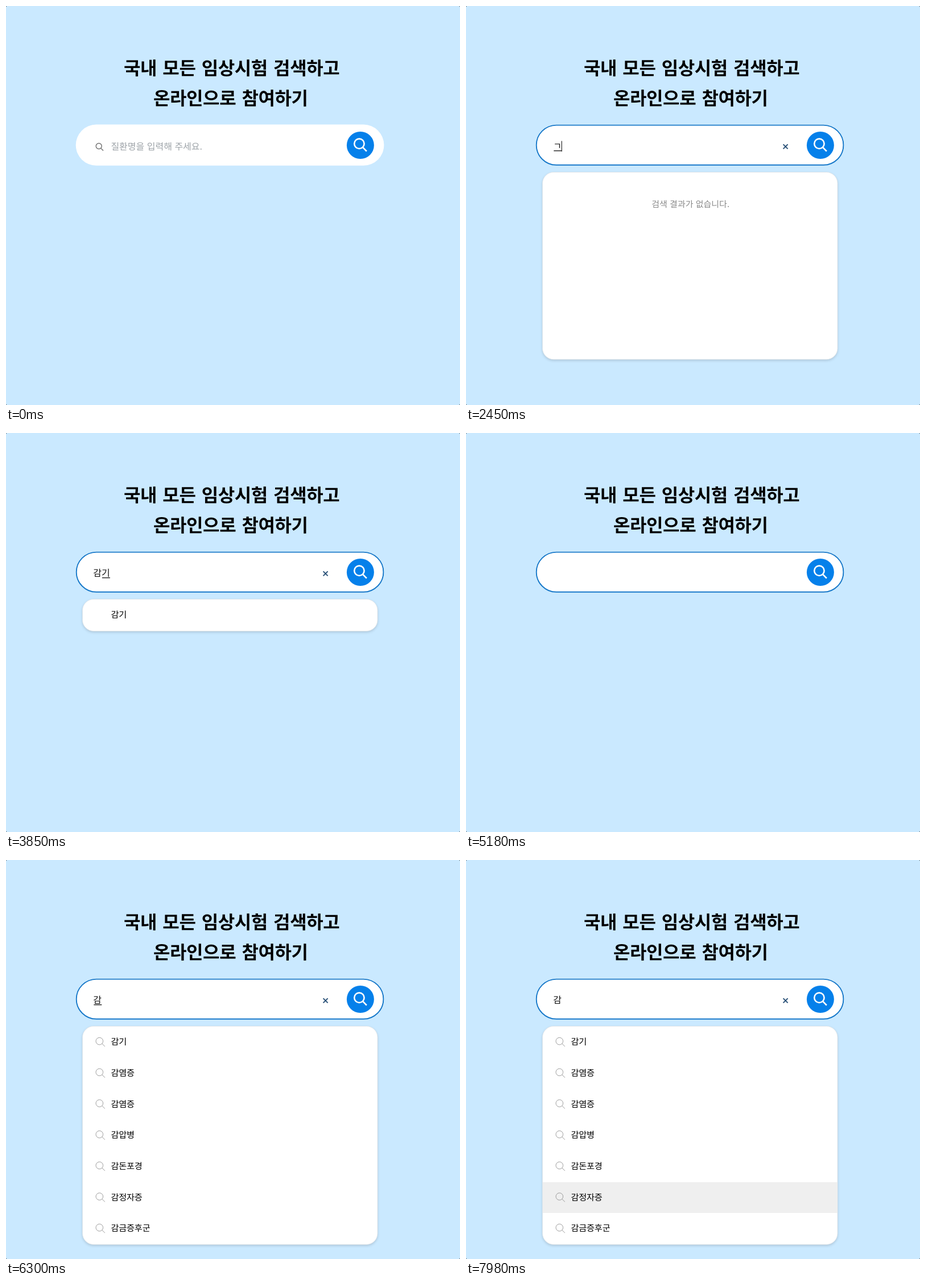
Write an HTML page that moves like this. It is 798x702 px and loops after 8000 ms.

```html
<!DOCTYPE html>
<html lang="ko">
<head>
<meta charset="utf-8">
<title>검색</title>
<style>
  html, body { margin: 0; width: 100%; height: 100%; overflow: hidden; background: #333; }
  svg { display: block; width: 798px; height: 702px; border-radius: 2px; background: #cae9ff; }
  text {
    font: 500 16px "Noto Sans CJK KR", "Noto Sans CJK JP", "Noto Sans CJK", sans-serif;
    text-rendering: geometricPrecision;
    white-space: pre;
  }
  .title text { font-size: 32px; font-weight: 700; letter-spacing: -.4px; word-spacing: 1.7px; }
  .row text { font-size: 15.2px; letter-spacing: -.15px; }
  #empty { font-size: 15px; fill: #8a8a8a; }
  #panel { filter: drop-shadow(0 2px 2px rgba(0, 0, 0, .14)); }
  .icon { fill: none; }
</style>
</head>
<body>
<svg viewBox="0 0 798 702">
  <defs>
    <clipPath id="panelClip"><rect id="clipBox" x="134.5" y="292.5" width="518.5" rx="19.5"/></clipPath>
  </defs>

  <g class="title">
    <text x="207" y="121">국내 모든 임상시험 검색하고</text>
    <text x="259" y="174">온라인으로 참여하기</text>
  </g>

  <rect x="122.7" y="208.6" width="541.7" height="72.2" rx="36.1" fill="#fff"/>
  <rect id="focusRing" x="123.7" y="209.6" width="539.7" height="70.2" rx="35.1" fill="none" stroke="#1477c9" stroke-width="1.9"/>
  <circle cx="622.9" cy="245" r="24" fill="#0580ea"/>
  <path class="icon" d="M629.6 242.3a8.7 8.7 0 1 1-17.4 0a8.7 8.7 0 1 1 17.4 0M627.2 248.6l6.7 7.1" stroke="#fff" stroke-width="2.6"/>

  <g id="placeholder">
    <path class="icon" d="M168.2 246.5a5 5 0 1 1-10 0a5 5 0 1 1 10 0M166.8 250.2l4.2 4.3" stroke="#707070" stroke-width="1.4"/>
    <text x="184.4" y="252.5" fill="#9da3a8">질환명을 입력해 주세요.</text>
  </g>

  <rect id="selection" x="154" y="238" width="29" height="18" fill="#b3d7fe"/>
  <text id="query" x="153.3" y="252.3" fill="#111"></text>
  <rect id="underline" y="254" width="14" height="1.4" fill="#222"/>
  <rect id="caret" y="237.5" width="1.4" height="18.5" fill="#444"/>
  <path id="clear" d="M557.6 243.4l8 8m0-8l-8 8" stroke="#2c5379" stroke-width="2"/>

  <g id="results">
    <rect id="panel" x="134.5" y="292.5" width="518.5" rx="19.5" fill="#fff" stroke="#e2e5e8" stroke-width=".8"/>
    <rect id="hover" x="135" width="518" height="54.2" fill="#efefef" clip-path="url(#panelClip)"/>
    <text id="empty" x="326.3" y="353.6">검색 결과가 없습니다.</text>
    <g id="rows"></g>
  </g>
</svg>
<script>
const LOOP = 8000, ROW = 54.67, TOP = 293;
const MATCHES = ["감기", "감염증", "감염증", "감압병", "감돈포경", "감정자증", "감금증후군"];

// Each step changes only the listed parts of the state.
// composing: index of the underlined syllable; rows: null = closed, 0 = no match.
const STEPS = [
  { at: 0, focus: false, text: "", composing: -1, caret: false, selected: false, rows: null, icons: false, hover: -1 },
  { at: 980, focus: true, caret: true },
  { at: 1540, caret: false },
  { at: 2100, caret: true },
  { at: 2450, text: "ㄱ", composing: 0, rows: 0 },
  { at: 2520, text: "가" },
  { at: 2800, text: "감" },
  { at: 3080, text: "감ㄱ", composing: 1 },
  { at: 3220, text: "감기" },
  { at: 3780, caret: false },
  { at: 3850, rows: 1 },
  { at: 3920, icons: true },
  { at: 4270, caret: true },
  { at: 4690, caret: false, composing: -1, selected: true },
  { at: 5180, text: "", selected: false, rows: null },
  { at: 5460, text: "ㄱ", composing: 0, caret: true, rows: 0 },
  { at: 5530, text: "가" },
  { at: 5670, text: "감" },
  { at: 6230, caret: false },
  { at: 6300, rows: 7 },
  { at: 6720, caret: true },
  { at: 7070, composing: -1, hover: 0 },
  { at: 7630, caret: false, hover: 1 },
  { at: 7700, hover: 2 },
  { at: 7770, hover: 3 },
  { at: 7840, hover: 4 },
  { at: 7980, hover: 5 }
];

const $ = id => document.getElementById(id);
const show = (element, visible) => element.style.display = visible ? "" : "none";

$("rows").innerHTML = MATCHES.map((name, i) => `
  <g class="row" transform="translate(0 ${i * ROW})">
    <path class="icon" d="M170.6 318.7a6.3 6.3 0 1 1-12.6 0a6.3 6.3 0 1 1 12.6 0M168.7 323.1l5.2 5" stroke="#929292" stroke-width=".9"/>
    <text x="184.4" y="325.2">${name}</text>
  </g>`).join("");
const rows = [...$("rows").children];

function render(s) {
  show($("placeholder"), !s.focus);
  show($("focusRing"), s.focus);
  show($("clear"), s.text);
  show($("selection"), s.selected);
  $("query").textContent = s.text;

  show($("underline"), s.composing >= 0);
  $("underline").setAttribute("x", 154.3 + 14.6 * s.composing);
  show($("caret"), s.caret);
  $("caret").setAttribute("x", s.text ? 153.2 + 14.4 * s.text.length : 153.9);

  show($("results"), s.rows !== null);
  show($("empty"), s.rows === 0);
  const height = (s.rows || 6) * ROW + 1.3;
  $("panel").setAttribute("height", height);
  $("clipBox").setAttribute("height", height);
  rows.forEach((row, i) => {
    show(row, i < s.rows);
    show(row.firstElementChild, s.icons);
  });
  show($("hover"), s.hover >= 0);
  $("hover").setAttribute("y", TOP + .4 + s.hover * ROW);
}

let shown = 0;
function frame() {
  const time = performance.now() % LOOP;
  const past = STEPS.filter(step => step.at <= time);
  if (past.length !== shown) {
    shown = past.length;
    render(Object.assign({}, ...past));
  }
  requestAnimationFrame(frame);
}
frame();
</script>
</body>
</html>
```
